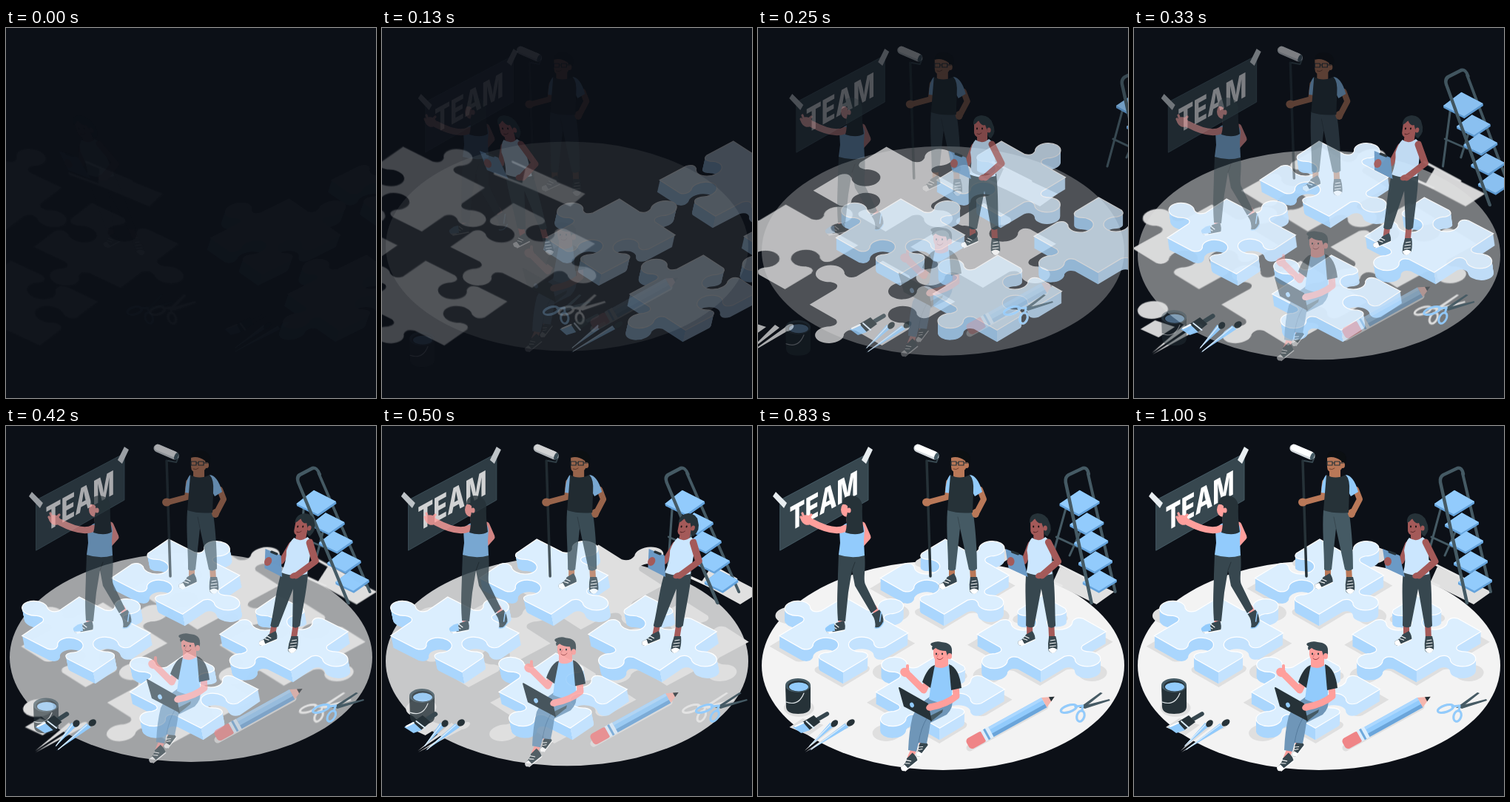
Write an HTML page that moves like this. It is 500 by 500 pixels and loops after 1040 ms.

```html
<!DOCTYPE html>
<html lang="en">
<head>
<meta charset="utf-8">
<title>Team puzzle</title>
<style>
html, body { margin: 0; width: 100%; height: 100%; overflow: hidden; background: #0c1017; }
svg { display: block; width: 100vw; height: 100vh; }
</style>
</head>
<body>
<svg id="stage" viewBox="0 0 500 500"></svg>
<script>
const LOOP = 1040, FRAME = 1000 / 24;
const DARK = '#263238', SLATE = '#37474f', STEEL = '#455a64', BLUE = '#92cbfc', SHADE = '#dfdfdf', PINK = '#ff9f9c';

const fill = (d, color, extra = '') => `<path d="${d}" fill="${color}" ${extra}/>`;
const line = (d, color, width, extra = '') =>
  `<path d="${d}" fill="none" stroke="${color}" stroke-width="${width}" stroke-linecap="round" stroke-linejoin="round" ${extra}/>`;
const oval = (x, y, rx, ry, color, turn = 0, extra = '') =>
  `<ellipse cx="${x}" cy="${y}" rx="${rx}" ry="${ry}" fill="${color}" transform="rotate(${turn} ${x} ${y})" ${extra}/>`;
const place = (transform, body) => `<g transform="${transform}">${body}</g>`;

// Key poses of the skewed slide, in 24 fps steps
const POSES = [0, 3, 6, 8, 12, 16, 24];
const SHIFT = [248, 193, 78, 18, -15, 0, 0];
const SKEW = [-.35, -.23, 0, .14, .2, .02, 0];
const SOLID = [.02, .26, .76, .95, 1, 1, 1];

function curve(values, k) {
  let i = 0;
  while (i < POSES.length - 2 && k >= POSES[i + 1]) i++;
  const last = POSES.length - 1;
  const tangent = j => {
    if (j === last) return 0;
    const a = Math.max(j - 1, 0);
    return (values[j + 1] - values[a]) / (POSES[j + 1] - POSES[a]);
  };
  const span = POSES[i + 1] - POSES[i], u = (k - POSES[i]) / span;
  const u2 = u * u, u3 = u2 * u;
  return values[i] * (2 * u3 - 3 * u2 + 1) + values[i + 1] * (3 * u2 - 2 * u3)
    + span * (tangent(i) * (u3 - 2 * u2 + u) + tangent(i + 1) * (u3 - u2));
}

// Outline of a jigsaw piece on a 100 x 100 square; tabs: NE, SE, SW, NW, 1 = knob, -1 = notch
function outline(tabs) {
  const corners = [[0, 0], [100, 0], [100, 100], [0, 100]];
  const dirs = [[1, 0], [0, 1], [-1, 0], [0, -1]];
  return 'M0 0' + tabs.map((side, i) => {
    const [x, y] = corners[i], [dx, dy] = dirs[i];
    const at = (a, out) => `${x + dx * a + dy * out * side} ${y + dy * a - dx * out * side} `;
    return `L${at(36, 0)}Q${at(45, 3)}${at(40.5, 12)}`
      + `A14 14 0 1 ${side > 0 ? 1 : 0} ${at(59.5, 12)}Q${at(55, 3)}${at(64, 0)}L${at(100, 0)}`;
  }).join('') + 'Z';
}

const iso = (x, y, s = 1) => `matrix(${.865 * s},${.488 * s},${-.875 * s},${.525 * s},${x},${y})`;

const pieces = [
  { x: 251, y: 153, tabs: [1, 1, -1, -1] },
  { x: 115, y: 231, tabs: [1, -1, -1, 1] },
  { x: 382.5, y: 229, tabs: [-1, 1, 1, -1] },
  { x: 246, y: 307, tabs: [-1, -1, 1, 1] }
];

function pieceArt({ x, y, tabs }) {
  const d = outline(tabs);
  let art = '';
  for (let z = 16; z > 0; z--) art += fill(d, 'url(#side)', `transform="${iso(x, y + z)}"`);
  return art + fill(d, '#dbeefe',
    `stroke="#fff" stroke-width="1.2" vector-effect="non-scaling-stroke" transform="${iso(x, y)}"`);
}

const pieceShade = ({ x, y, tabs }) =>
  fill(outline(tabs), SHADE, `transform="${iso(x + .6, y + 7.5, 1.13)}"`);

// Shoes: seen from the side with the toe left, or from the front
const sideShoe = transform => place(transform,
  fill('M2 7Q10 6 15 0L25 -3Q28 4 26 10L6 14Q-1 13 2 7Z', SLATE)
  + fill('M2 7Q6 6 8 6L10 13L6 14Q-1 13 2 7Z', '#fff')
  + line('M5 14L26 10', '#fff', 1.5) + line('M10 5L15 8M13 2L18 6', '#fff', 1.1));
const frontShoe = (x, y) => place(`translate(${x} ${y})`,
  fill('M2 0H11Q14 10 13 18Q7 27 1 19Q0 10 2 0Z', SLATE)
  + fill('M1 18Q7 13 13 18Q7 28 1 18Z', '#fff')
  + line('M4 6L10 5M3 10L11 9M3 14L11 13', '#fff', 1.1));

const sign =
  fill('M30 100L149 37V100L30 168Z', SLATE) + line('M30 100L149 37V100L30 168Z', STEEL, 1)
  + `<text transform="matrix(.69,-.38,0,1,42.5,143)" font-family="Inter, Arial, sans-serif" font-weight="800" font-size="45" fill="#fff">TEAM</text>`
  + fill('M20 95L24 89L39 104L35 111Z', '#e8edf0') + fill('M140 46L149 28L155 32L146 51Z', '#e8edf0');

const step = (x, y, w) =>
  fill(`M${x - w} ${y + 2}L${x} ${y - w * .6}L${x + w} ${y - 1}V${y + 2}L${x - 1} ${y + w * .6 + 3}L${x - w} ${y + 5}Z`, '#64a3dc')
  + fill(`M${x - w} ${y + 2}L${x} ${y - w * .6}L${x + w} ${y - 1}L${x - 1} ${y + w * .6}Z`, BLUE);
const ladder =
  line('M417 102L394 187M438 135L420 175M402 150L430 163', STEEL, 3)
  + line('M444 64L482 224', STEEL, 4)
  + step(433, 103, 27) + step(443, 131, 23) + step(449, 156, 23) + step(455, 183, 23) + step(461, 209, 23)
  + line('M450 239L414 76Q413 69 418 66L437 57Q443 55 445 65', STEEL, 4.5);

const painter = (() => {
  const skin = '#b97858';
  return line('M228 47L233 203', DARK, 3.5) + line('M230 47L241 49L244 42', SLATE, 2)
    + line('M216 30L239 40', '#d5dade', 11) + line('M216 29L238 38', '#fff', 8) + oval(241, 41, 2.5, 5, STEEL, 22)
    + line('M262 190V205M290 190L291 208', skin, 8)
    + sideShoe('translate(241 208) rotate(-14)') + frontShoe(285, 204)
    + fill('M256 113H290C293 130 296 160 296 193Q290 198 285 194L273 138L267 194Q262 197 257 194C257 165 254 140 256 113Z', STEEL)
    + line('M273 138L270 123', SLATE, 1)
    + line('M300 86L305 99L295 118', skin, 8) + oval(294, 118, 5, 6, skin)
    + fill('M264 54H279V70Q271 74 264 68Z', skin)
    + line('M258 76L256 96L230 103', skin, 8) + oval(228, 103, 6, 5.5, skin)
    + fill('M260 66Q254 71 253 90L261 91Z', BLUE) + fill('M286 66Q297 67 303 89L293 95L287 84Z', BLUE)
    + fill('M260 66Q272 73 286 66Q292 72 291 88L290 117Q272 119 256 114Z', DARK)
    + fill('M261 42Q269 36 282 43V54Q280 63 270 63Q261 63 261 55Z', skin)
    + fill('M261 43Q261 33 273 33Q286 34 287 44Q287 53 282 57L280 47Q270 40 261 43Z', '#0b0f12')
    + oval(282, 53, 3, 4, skin)
    + line('M261 48h7v5h-7zM271 48h7v5h-7zM268 50h3M278 50h5', DARK, 1.2)
    + line('M264 58Q268 60 271 57', '#70412f', 1);
})();

const hanger =
  line('M141 134L148 150L139 160', PINK, 9)
  + line('M112 258L113 269M157 246L162 256', PINK, 8)
  + sideShoe('translate(91 266)') + fill('M91 273Q97 267 103 267L104 277L94 278Q90 277 91 273Z', BLUE)
  + place('translate(151 253) rotate(-20)', fill('M2 2L14 0Q17 9 13 18Q6 25 0 21Q5 12 2 2Z', SLATE)
    + line('M0 21Q6 25 13 18', BLUE, 1.5) + line('M9 15L15 4', BLUE, 1.5))
  + fill('M109 173H144C146 195 142 205 145 214L161 247L153 253L131 216L127 195L122 225L118 264L108 263C106 235 108 215 108 200Z', SLATE)
  + line('M127 195L131 184', DARK, 1)
  + fill('M110 140Q116 131 128 128Q142 127 144 140L143 155L144 175Q127 180 109 174L111 158Z', BLUE)
  + line('M118 138Q103 146 73 130', PINK, 9) + oval(66, 127, 8, 6.5, PINK, 25)
  + line('M63 126L60 118M60 127L58 123M68 124L72 120', PINK, 3.2)
  + oval(120, 113, 8, 10, PINK) + fill('M119 118H130V132H120Z', PINK)
  + fill('M114 106Q114 95 125 94Q139 94 141 108Q140 122 143 143Q134 149 118 144Q121 134 119 124Q122 116 121 108Q118 105 114 106Z', DARK)
  + oval(123, 114, 2.6, 3.5, PINK);

const reader = (() => {
  const skin = '#a45a59';
  return line('M368 265V284M397 265L398 288', skin, 8)
    + sideShoe('translate(349 285) rotate(-13) scale(.95)') + frontShoe(392, 284)
    + fill('M364 197H400C403 225 402 250 403 270Q398 275 393 271L384 220L374 271Q368 274 363 270C364 245 361 220 364 197Z', SLATE)
    + fill('M374 140H388V160Q380 165 374 158Z', skin)
    + line('M370 160L361 183L345 184', skin, 8)
    + fill('M336 166L359 175L366 204L340 192Z', '#6b9ac6') + line('M345 170L353 173', DARK, 3) + oval(343, 183, 5, 6, skin)
    + fill('M372 151Q381 158 390 150Q398 155 398 168L399 200Q382 205 364 198Q368 182 365 168Q367 156 372 151Z', '#cbe6fe')
    + line('M394 157L407 183L385 202', skin, 9) + oval(382, 202, 6, 4, skin, -20)
    + fill('M370 130Q374 122 389 127V139Q386 149 377 148Q369 147 370 138Z', skin)
    + fill('M369 131Q368 119 380 118Q392 119 395 129Q401 140 393 149Q387 148 388 139L385 131Q380 133 376 125Q373 129 369 131Z', DARK)
    + oval(390, 138, 2.6, 3.6, skin)
    + oval(374, 136, 1, 1.4, '#1b1414') + oval(381, 136, 1, 1.4, '#1b1414') + line('M374 143Q377 145 380 142', '#5f2c2d', 1);
})();

const sitter =
  line('M222 424V434M211 436L206 448', PINK, 8)
  + sideShoe('translate(208 440) rotate(-42) scale(.85)')
  + sideShoe('translate(188 456) rotate(-28)')
  + fill('M232 366L262 368Q265 380 255 390L233 401Q231 415 228 429L217 428L214 440L203 438Q204 412 209 392Q216 376 232 366Z', '#6f96b8')
  + line('M217 428Q220 408 228 395', '#557b9d', 1)
  + line('M229 346L224 357L204 337', PINK, 9) + oval(199, 333, 7, 6, PINK, 30)
  + line('M202 331L202 324', PINK, 4)
  + fill('M239 308H257V327Q248 332 239 326Z', PINK)
  + fill('M237 324Q248 331 259 322Q266 330 262 350V370Q248 378 231 369Q235 345 232 336Z', BLUE)
  + fill('M239 323Q229 326 222 346L233 354Z', DARK)
  + line('M267 350L268 365Q255 376 233 380', PINK, 9)
  + fill('M258 322Q272 327 275 354L261 357Z', DARK)
  + fill('M232 392L250 383L249 387L233 400Z', STEEL)
  + fill('M190 354Q190 352 193 354L230 375L235 399L197 379Z', DARK) + oval(208, 377, 2.7, 3.5, BLUE, -25)
  + oval(233, 380, 6, 4.5, PINK, -20)
  + fill('M237 301Q246 293 259 301V310Q257 320 247 320Q238 319 237 309Z', PINK)
  + fill('M236 303Q234 299 236 298Q231 295 235 293Q242 290 248 292Q262 293 262 303Q263 312 257 314L254 304Q245 304 240 300Z', SLATE)
  + oval(259, 311, 3, 4, PINK)
  + oval(241, 308, 1, 1.4, DARK) + oval(249, 308, 1, 1.4, DARK)
  + line('M242 314Q246 318 250 313', '#a84446', 1) + line('M244 308L242 312', '#dc7679', 1);

const pencil =
  line('M286 435L388 379', SHADE, 9)
  + place('translate(294 425) rotate(-29)',
    `<rect x="-12" y="-8" width="26" height="16" rx="5" fill="#ef8587"/>`
    + fill('M12 -8H24V8H12Z', '#dceefd') + fill('M16 -8H19V8H16Z', '#6fa9dc')
    + fill('M24 -7.5H106V7.5H24Z', BLUE) + fill('M24 2.5H106V7.5H24Z', '#6ba5da') + fill('M24 -7.5H106V-3.5H24Z', '#acd8ff')
    + fill('M106 -7.5L122 0L106 7.5Z', '#f5b6ae') + fill('M115 -3.3L122 0L115 3.3Z', DARK));

const scissors = (blade, handle) =>
  fill('M437 379L476 369L477 371L443 382Z', blade) + fill('M435 381L464 360L467 361L443 380Z', blade)
  + oval(421, 382, 11, 4.5, 'none', -18, `stroke="${handle}" stroke-width="3"`)
  + oval(437, 392, 5, 7.5, 'none', 18, `stroke="${handle}" stroke-width="3"`)
  + line('M430 379L440 378L439 385', handle, 3);

const brushes =
  line('M80 396L92 389', SLATE, 5.5)
  + fill('M59 400L74 391L83 400L68 411Z', DARK) + line('M64 399L74 408', '#dceefd', 2)
  + fill('M59 400L69 411L57 415L46 407Z', BLUE) + line('M49 406L60 401', '#fff', 2)
  + fill('M67 434L96 401L102 405Z', BLUE) + fill('M68 439L116 402L121 407Z', BLUE)
  + line('M69 432L97 403M71 437L116 404', '#dceefd', 1.2)
  + oval(102, 402, 5.5, 4, DARK, -45) + oval(124, 401, 6, 4, DARK, -35);

const bucket =
  fill('M37 351H71V380Q70 389 54 389Q39 389 38 380Z', DARK)
  + oval(54, 350.5, 17, 9.5, STEEL) + oval(54.5, 351.5, 14, 7.5, DARK) + oval(55, 352.5, 13, 6, BLUE)
  + line('M38 373Q55 379 62 361', '#dfe5e8', 1.2);

const shadows =
  fill('M410 190L483 224L459 241L400 212Z', '#e0e0e0')
  + line('M395 181L447 207M367 197L412 216', '#e8e8e8', 3)
  + pieces.map(pieceShade).join('')
  + oval(56, 381, 20.5, 12, SHADE)
  + fill('M43 407L61 395L89 404L69 418Z', SHADE)
  + fill('M63 439L101 401L107 405Z', SHADE) + fill('M64 441L118 402L122 407Z', SHADE)
  + oval(120, 405, 7, 4, SHADE, -30)
  + scissors('#e3e3e3', '#e3e3e3');

// slide: layers skew in about the height "mid", way 1 from the right and -1 from the left
// drift: layers fade in while they settle from an offset
const layers = [
  { art: oval(250, 323.5, 245, 141.5, '#f3f3f3'), drift: [0, -31] },
  { art: shadows, way: -1, mid: 291 },
  { art: sign, drift: [31, 0] },
  { art: ladder, way: 1, mid: 148 },
  { art: pieces.map(pieceArt).join(''), way: 1, mid: 287 },
  { art: painter, drift: [-31, 0] },
  { art: hanger, drift: [0, 0] },
  { art: bucket, drift: [0, 75] },
  { art: brushes, way: 1, mid: 412 },
  { art: pencil, drift: [0, -31] },
  { art: scissors(STEEL, BLUE), way: -1, mid: 380 },
  { art: reader, way: -1, mid: 214 },
  { art: sitter, drift: [0, -31] }
];

const stage = document.getElementById('stage');
stage.innerHTML = `<defs><linearGradient id="side" gradientUnits="userSpaceOnUse" x1="0" y1="100" x2="100" y2="0">
  <stop offset=".5" stop-color="#aad6fd"/><stop offset=".5" stop-color="#c3e2fe"/></linearGradient></defs>
  <rect width="500" height="500" fill="#0c1017"/>` + layers.map(l => `<g class="layer">${l.art}</g>`).join('');
const groups = [...stage.querySelectorAll('.layer')];

function draw(ms) {
  const k = Math.min(24, Math.floor((ms % LOOP + 5) / FRAME));
  const ease = (1 - Math.cos(Math.PI * Math.min(1, k * FRAME / 700))) / 2;
  const solid = Math.min(1, curve(SOLID, k));
  const shift = curve(SHIFT, k), skew = curve(SKEW, k);
  layers.forEach(({ drift, way, mid }, i) => {
    const transform = drift
      ? `translate(${drift.map(v => v * (1 - ease)).join(' ')})`
      : `matrix(1 0 ${way * skew} 1 ${way * (shift - skew * mid)} 0)`;
    groups[i].setAttribute('transform', transform);
    groups[i].setAttribute('opacity', (drift ? ease : solid).toFixed(3));
  });
}

const start = performance.now();
function tick() {
  draw(performance.now() - start);
  requestAnimationFrame(tick);
}
draw(0);
requestAnimationFrame(tick);
</script>
</body>
</html>
```
